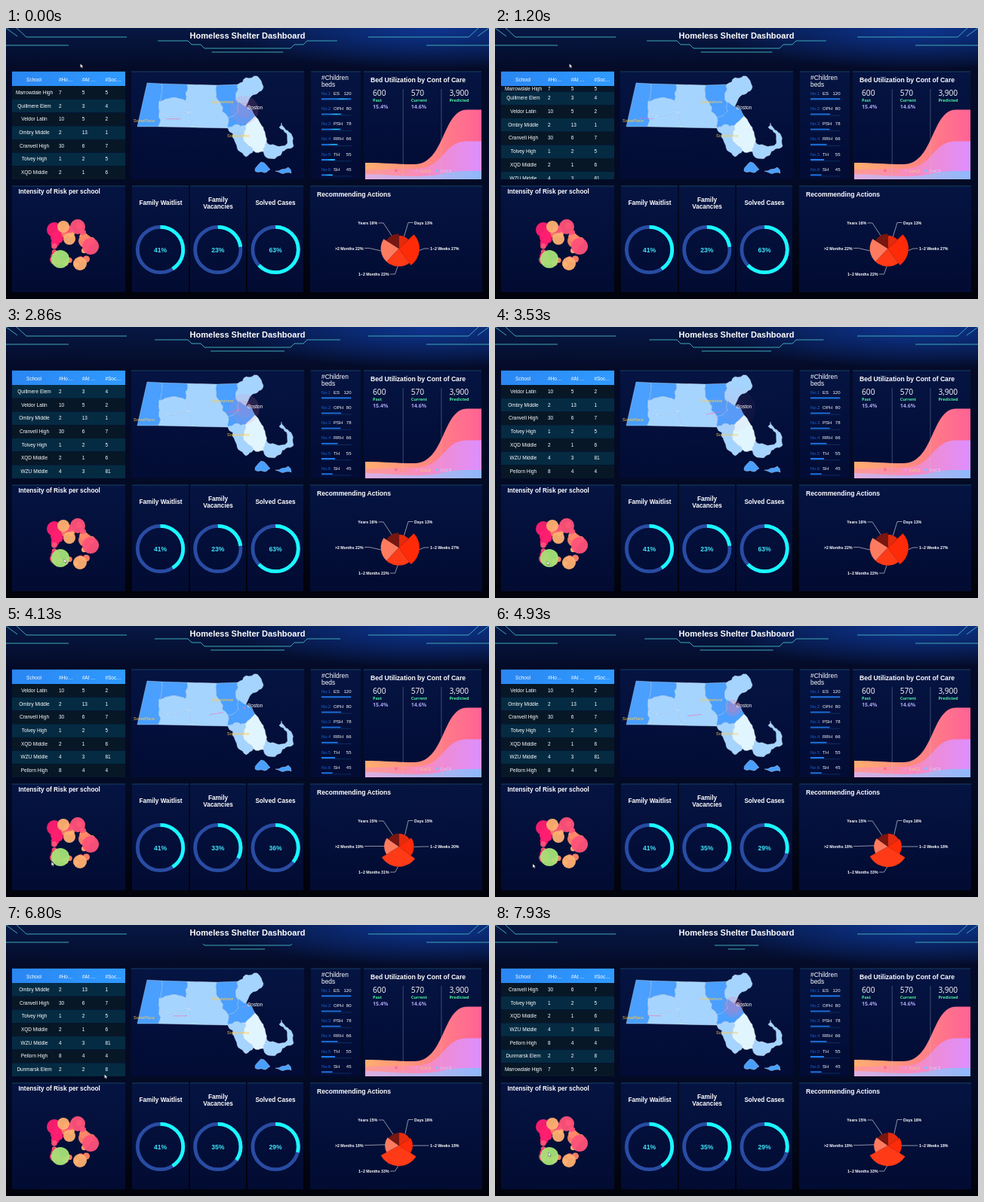
Write an HTML page that moves like this. It is 640 by 360 pixels and loops after 8 s.

```html
<!DOCTYPE html>
<html lang="en">
<head>
<meta charset="utf-8">
<title>Homeless Shelter Dashboard</title>
<style>
html, body { margin: 0; width: 100%; height: 100%; overflow: hidden; background: #02040f; }
#stage { display: block; width: 100vw; height: 100vh; font-family: "Liberation Sans", Arial, sans-serif; }
text { dominant-baseline: central; }
.open { font-family: "Open Sans", sans-serif; }
</style>
</head>
<body>
<svg id="stage" viewBox="0 0 640 360">
  <defs>
    <linearGradient id="sky" x2="0" y2="1">
      <stop offset="0" stop-color="#071844"/><stop offset=".15" stop-color="#040b28"/><stop offset=".6" stop-color="#030a24"/><stop offset="1" stop-color="#01020a"/>
    </linearGradient>
    <radialGradient id="glow"><stop offset="0" stop-color="#0d3590"/><stop offset="1" stop-color="#0d3590" stop-opacity="0"/></radialGradient>
    <linearGradient id="panel" x2="0" y2="1"><stop offset="0" stop-color="#051545"/><stop offset="1" stop-color="#020c36"/></linearGradient>
    <linearGradient id="head"><stop offset="0" stop-color="#2a86f2"/><stop offset="1" stop-color="#2f9aff"/></linearGradient>
    <linearGradient id="topArea"><stop offset="0" stop-color="#ffae70"/><stop offset=".5" stop-color="#ff8a80"/><stop offset="1" stop-color="#ff6295"/></linearGradient>
    <linearGradient id="midArea"><stop offset="0" stop-color="#ff9a90"/><stop offset=".5" stop-color="#f78bc0"/><stop offset="1" stop-color="#dd8fff"/></linearGradient>
    <linearGradient id="lowArea"><stop offset="0" stop-color="#e0aee0"/><stop offset="1" stop-color="#8fb8fb"/></linearGradient>
    <radialGradient id="shine"><stop offset=".05" stop-color="#28f8ff"/><stop offset=".8" stop-color="#28f8ff" stop-opacity="0"/></radialGradient>
  </defs>
</svg>
<script>
const LOOP = 8000;
const stage = document.getElementById('stage');
const clamp = v => Math.min(1, Math.max(0, v));
const mix = (a, b, k) => a + (b - a) * k;
const easeOut = k => 1 - (1 - k) ** 3;
const easeInOut = k => k * k * (3 - 2 * k);
const random = seed => { const v = Math.sin(seed * 12.9898) * 43758.5453; return v - Math.floor(v); };

function set(node, attrs) {
  for (const key in attrs) node.setAttribute(key, attrs[key]);
  return node;
}
function add(tag, attrs, parent = stage) {
  const node = document.createElementNS('http://www.w3.org/2000/svg', tag);
  parent.appendChild(set(node, attrs));
  return node;
}
function label(x, y, size, text, attrs = {}, parent = stage) {
  const node = add('text', { x, y, 'font-size': size, fill: '#fff', ...attrs }, parent);
  node.textContent = text;
  return node;
}
const bold = { 'font-weight': 700 };
const centred = { 'text-anchor': 'middle' };
const line = (points, stroke, width = 1, attrs = {}) =>
  add('polyline', { points, stroke, 'stroke-width': width, fill: 'none', ...attrs });

// Backdrop and header
add('rect', { width: 640, height: 360, fill: 'url(#sky)' });
add('ellipse', { cx: 560, cy: 0, rx: 270, ry: 55, fill: 'url(#glow)' });
for (const side of ['', 'matrix(-1 0 0 1 640 0)']) {
  line('14,0 27,12 160,12', '#3fa8b8', 1, { transform: side });
  line('0,0 15,11', '#3fa8b8', 1, { transform: side });
  line('0,23 83,23', '#3fa8b8', 1, { transform: side });
}
const ornaments = ['197,17 241,17 246,22 258,22 263,27 377,27 382,22 394,22 399,17 443,17', '271,32 369,32']
  .map(points => line(points, '#3fa8b8', 1, { pathLength: 1 }));
label(320, 9.8, 11, 'Homeless Shelter Dashboard', { ...bold, ...centred });

// Panels
function panel(x, y, width, height) {
  add('rect', { x, y, width, height, fill: 'url(#panel)', opacity: .9 });
  line(`${x},${y} ${x + width},${y}`, '#1c4d70', .8);
}
[[8, 150], [166, 229], [404, 66], [474, 156]].forEach(([x, width]) => panel(x, 58, width, 143));
[[8, 150], [167, 75], [244, 74], [320, 74], [403, 228]].forEach(([x, width]) => panel(x, 210, width, 141));

// Scrolling table
const ROW = 17.72;
const columnX = i => 70 + i * 30.7;
add('rect', { x: 8, y: 58, width: 150, height: 19, fill: 'url(#head)' });
label(37, 68, 6.5, 'School', centred);
['#Ho…', '#At …', '#Soc…'].forEach((text, i) => label(columnX(i), 68, 6.5, text));
const tableBody = add('svg', { x: 8, y: 77, width: 150, height: 124 });
const rows = [
  ['Marrowdale High', 7, 5, 5], ['Quillmere Elem', 2, 3, 4], ['Veldor Latin', 10, 5, 2],
  ['Ombry Middle', 2, 13, 1], ['Cranvell High', 30, 6, 7], ['Tolvey High', 1, 2, 5],
  ['XQD Middle', 2, 1, 6], ['WZU Middle', 4, 3, 81], ['Pellorn High', 8, 4, 4], ['Dunmarsk Elem', 2, 2, 8]
].map(([name, ...values], i) => {
  const row = add('svg', { width: 150, height: ROW }, tableBody);
  add('rect', { width: 150, height: '100%', fill: i % 2 ? '#052b42' : '#071726' }, row);
  label(29.5, '47%', 6.5, name, centred, row);
  values.forEach((v, k) => label(columnX(k) - 8, '47%', 6.5, v, {}, row));
  return row;
});
function drawTable(t) {
  const step = Math.floor((t - 1100) / 2000);
  const slide = step < 0 ? 0 : 1 - (1 - clamp((t - 1100 - step * 2000) / 300)) ** 2.1;
  const top = Math.max(0, step);
  rows.forEach((row, i) => {
    const place = (i - top + rows.length) % rows.length;
    set(row, place
      ? { y: (place - slide) * ROW, height: ROW }
      : { y: 0, height: Math.max(.01, ROW * (1 - slide)) });
  });
}

// Map: named corners shared by neighbouring regions
const corners = {};
`A187,73 B206,74 C240,75 D279,76 E307,75 F318,66 G333,64 H341,78 I323,93 J318,104 K330,117 L343,138 M345,151
 a203,98 b202,131 c174,131 d238,97 e245,112 f203,114 g247,132 h294,133 i284,100 j294,119 k307,98 l308,111
 m317,130 n315,150 o328,163 p318,171 r303,150 s341,164 t357,156 u373,153 v372,140 w362,132 x365,126
 y379,143 z381,157 1364,169 2347,173 3330,190 4338,178 5350,188 6357,190 7374,185 8378,193`
  .split(/\s+/).forEach(item => { corners[item[0]] = item.slice(1).split(',').map(Number); });

// Splits an edge with a bend that is the same seen from either side
function roughEdge([ax, ay], [bx, by], depth) {
  const dx = bx - ax, dy = by - ay;
  if (!depth || Math.hypot(dx, dy) < 5) return [[bx, by]];
  const sign = ax + 3 * ay < bx + 3 * by ? 1 : -1;
  const bend = sign * (random(ax + bx + 1.7 * (ay + by)) - .5) * .34;
  const mid = [(ax + bx) / 2 - dy * bend, (ay + by) / 2 + dx * bend];
  return [...roughEdge([ax, ay], mid, depth - 1), ...roughEdge(mid, [bx, by], depth - 1)];
}
const STRAIGHT = ['AB', 'BC', 'CD', 'DE', 'Ac', 'bc', 'bg', 'gh'];
function region(names, fill) {
  const points = [...names].flatMap((from, i) => {
    const to = names[(i + 1) % names.length];
    const straight = STRAIGHT.includes(from + to) || STRAIGHT.includes(to + from);
    return roughEdge(corners[from], corners[to], straight ? 0 : 3);
  });
  add('polygon', { points: points.join(' '), fill, stroke: '#dcf0ff', 'stroke-width': .35, 'stroke-linejoin': 'round' });
}
const BLUE = '#4a9fff', LIGHT = '#a5d4ff';
['ABafbc', 'BCda', 'DEklji', 'kJKmhjl', '345', '678'].forEach(names => region(names, BLUE));
['adef', 'fegb', 'CDijhged', 'EFGHIJk', 'hmnopr', 'Mtuvwxyz12s'].forEach(names => region(names, LIGHT));
region('mKLMson', '#e1f5ff');

const trail = line('', '#ff5fae', .8, { 'stroke-linecap': 'round', opacity: .7 });
const ripples = [1, .55].map(scale => ({
  scale, node: add('circle', { cx: 315.5, cy: 109, fill: '#e87aa8', stroke: '#ff6f9c', 'stroke-width': .7 })
}));
label(320, 105.5, 6.5, 'Boston');
[[169, 123, 'SomePlace'], [272, 97.5, 'Somewhere'], [293, 142.5, 'Somewhere']]
  .forEach(([x, y, text]) => label(x, y, 5.5, text, { fill: '#ffc947' }));

function drawMap(t) {
  const phase = ((t + 1750) % 2780) / 2780;
  for (const { scale, node } of ripples)
    set(node, {
      r: 34 * scale * phase ** 1.3,
      'fill-opacity': .42 * (1 - phase),
      'stroke-opacity': phase < .12 ? 0 : .9 * (1 - phase) ** 2
    });
  const along = ((t + 5700) % 7300) / 7300;
  const at = k => `${mix(315, 184, clamp(k))},${mix(109, 119, clamp(k)) + 6 * Math.sin(Math.PI * clamp(k))}`;
  set(trail, { points: `${at(along - .14)} ${at(along - .07)} ${at(along)}` });
}

// Ranking
label(418, 65.5, 8.4, '#Children');
label(418, 74.5, 8.4, 'beds');
const shines = [['ES', 120], ['OPH', 80], ['PSH', 78], ['RRH', 66], ['TH', 55], ['SH', 45]].map(([name, beds], i) => {
  const y = 86.7 + i * 20.2, width = 39.5 * beds / 120;
  label(418, y, 5.8, `No.${i + 1}`, { fill: '#1a64d0' });
  label(434, y, 6, name);
  label(457.5, y, 6, beds, { 'text-anchor': 'end' });
  line(`418,${y + 9.2} 457.5,${y + 9.2}`, '#174b87', .5);
  const bar = add('svg', { x: 418, y: y + 6.5, width, height: 2 });
  add('rect', { width, height: 2, fill: '#1f7cf2' }, bar);
  return { width, node: add('rect', { width: 22, height: 2, fill: 'url(#shine)' }, bar) };
});
function drawShines(t) {
  const away = Math.abs((t + 2750) % 6000 - 3000);
  const k = easeInOut(clamp(1 - away / 600));
  for (const { width, node } of shines) set(node, { x: mix(-22, width, k) });
}

// Bed utilization
label(546, 69, 8.6, 'Bed Utilization by Cont of Care', { ...bold, ...centred });
const area = (left, mid, right, fill) => add('path', {
  d: `M476 ${left}C500 ${left} 515 ${mid} 541 ${mid}C582 ${mid} 578 ${right} 611 ${right}H630V201H476Z`, fill
});
area(179, 181, 108.5, 'url(#topArea)');
area(188, 187, 150.5, 'url(#midArea)');
area(194, 197, 190, 'url(#lowArea)');
[['600', 'Past', '15.4%'], ['570', 'Current', '14.6%'], ['3,900', 'Predicted', '']]
  .forEach(([count, name, share], i) => {
    const x = 486 + i * 50.7;
    if (i) line(`${x - 10.5},81 ${x - 10.5},201`, '#b8c4de', .5, { opacity: .65 });
    label(x, 86, 10.2, count, { class: 'open' });
    label(x, 96, 5.5, name, { class: 'open', ...bold, fill: '#4df0a0' });
    label(x, 104.3, 7, share, { class: 'open', ...bold, fill: '#a9a4ee' });
  });
[['#ff6f78', '#ff914f'], ['#ef96d8', '#f5dc6a'], ['#8db8ff', '#c4eaff']].forEach(([dot, fill], i) => {
  const x = 517 + i * 27;
  add('circle', { cx: x, cy: 189.5, r: 1.9, fill: dot });
  label(x + 4.5, 189.5, 6, `CoC${i + 1}`, { class: 'open', fill });
});

// Bubbles: a ring of small ones under a few large ones
label(16.5, 217.3, 8.3, 'Intensity of Risk per school', bold);
const PINK = '#ff1f70', RED = '#ff5279', SALMON = '#ff8568', PEACH = '#ffb070', GREEN = '#a6e477';
const bubble = (cx, cy, r, fill) => add('circle', { cx, cy, r, fill, opacity: .95 });
for (let i = 1; i <= 22; i++) {
  const angle = i * 2.4, reach = mix(15, 29, random(i));
  const x = 85 + reach * Math.cos(angle), y = 289 + reach * Math.sin(angle);
  const hues = x < 72 ? [PINK, RED] : [RED, SALMON, PEACH];
  bubble(x, y, mix(3, 6.5, random(i + 40)), hues[i % hues.length]);
}
bubble(64, 268, 10, PINK);
bubble(95, 264, 10, RED);
bubble(76, 264, 8, PEACH);
bubble(84, 280, 8, PEACH);
bubble(67, 278, 8, PINK);
bubble(105, 283, 9, SALMON);
bubble(112, 290, 11, RED);
bubble(72, 307, 12, GREEN);
bubble(98, 313, 9, PEACH);

// Donuts
const statTitle = (x, y, text) => label(x, y, 8.2, text, { ...bold, ...centred });
statTitle(205, 232, 'Family Waitlist');
statTitle(281, 228, 'Family');
statTitle(281, 237, 'Vacancies');
statTitle(357, 232, 'Solved Cases');
const donuts = [[41, 41], [23, 35], [63, 29]].map(([from, to], i) => {
  const cx = 204.5 + i * 76.3, cy = 294.5;
  const ring = { cx, cy, r: 30.2, fill: 'none', 'stroke-width': 4.8 };
  add('circle', { ...ring, stroke: '#294ca3' });
  const arc = add('circle', { ...ring, stroke: '#19faff', pathLength: 100, transform: `rotate(-90 ${cx} ${cy})` });
  return { from, to, arc, text: label(cx, cy, 8.6, '', { ...bold, ...centred, fill: '#3fe0f5' }) };
});

// Rose chart
label(412, 220.8, 8.6, 'Recommending Actions', bold);
const CX = 520.5, CY = 293;
const slices = [
  ['Days', '#e52b0d', 13, 16, 541, 258.5],
  ['1~2 Weeks', '#ff2a08', 27, 18, 562, 293],
  ['1~2 Months', '#ff3a17', 22, 33, 507.5, 327],
  ['>2 Months', '#ff7b60', 22, 18, 473.5, 292.5],
  ['Years', '#78160f', 16, 15, 492, 259]
].map(([name, fill, from, to, x, y]) => ({
  name, from, to, x, y, inward: x < CX ? 1 : -1,
  leader: line('', '#e8e8ee', .6),
  sector: add('path', { fill }),
  text: label(x, y, 5.2, '', { 'text-anchor': x < CX ? 'end' : 'start', ...bold })
}));
function polar(turn, radius) {
  const a = (turn / 100 - .25) * 2 * Math.PI;
  return `${CX + radius * Math.cos(a)},${CY + radius * Math.sin(a)}`;
}
function drawStats(t) {
  const k = easeOut(clamp((t - 3800) / 800));
  for (const { from, to, arc, text } of donuts) {
    const value = mix(from, to, k);
    set(arc, { 'stroke-dasharray': `${value} 100` });
    text.textContent = `${Math.round(value)}%`;
  }
  let start = 0;
  for (const { name, from, to, x, y, inward, leader, sector, text } of slices) {
    const value = mix(from, to, k), end = start + value;
    const radius = 8 + value * mix(.72, .58, k);
    set(sector, { d: `M${CX},${CY}L${polar(start, radius)}A${radius},${radius} 0 0 1 ${polar(end, radius)}Z` });
    set(leader, { points: `${polar((start + end) / 2, radius)} ${x + inward * 8},${y} ${x + inward * 1.5},${y}` });
    text.textContent = `${name} ${Math.round(value)}%`;
    start = end;
  }
}

// Pointer: arrival time and place of each stop
const pointer = add('path', { d: 'M0 0V5.2L1.3 4.1 2.2 6 3.1 5.6 2.2 3.8H4Z', fill: '#fff', stroke: '#222', 'stroke-width': .35 });
const stops = [[0, 98.5, 47.5], [2600, 77, 308], [3500, 69, 311], [4500, 50, 316], [6300, 130.5, 198.5], [7800, 70.5, 302]];
function drawPointer(t) {
  let [, x, y] = stops[0];
  for (const [arrival, nextX, nextY] of stops.slice(1)) {
    const k = easeInOut(clamp((t - arrival) / 700 + 1));
    x = mix(x, nextX, k);
    y = mix(y, nextY, k);
  }
  set(pointer, { transform: `translate(${x} ${y})` });
}

function drawOrnaments(t) {
  const shown = 1 - (1 - ((t + 520) % 1200) / 1200) ** 6;
  for (const node of ornaments) set(node, { 'stroke-dasharray': `0 ${(1 - shown) / 2} ${shown} 1` });
}

function frame(now) {
  const t = Math.max(0, now) % LOOP;
  for (const draw of [drawOrnaments, drawTable, drawMap, drawShines, drawStats, drawPointer]) draw(t);
  requestAnimationFrame(frame);
}
frame(0);
</script>
</body>
</html>
```
